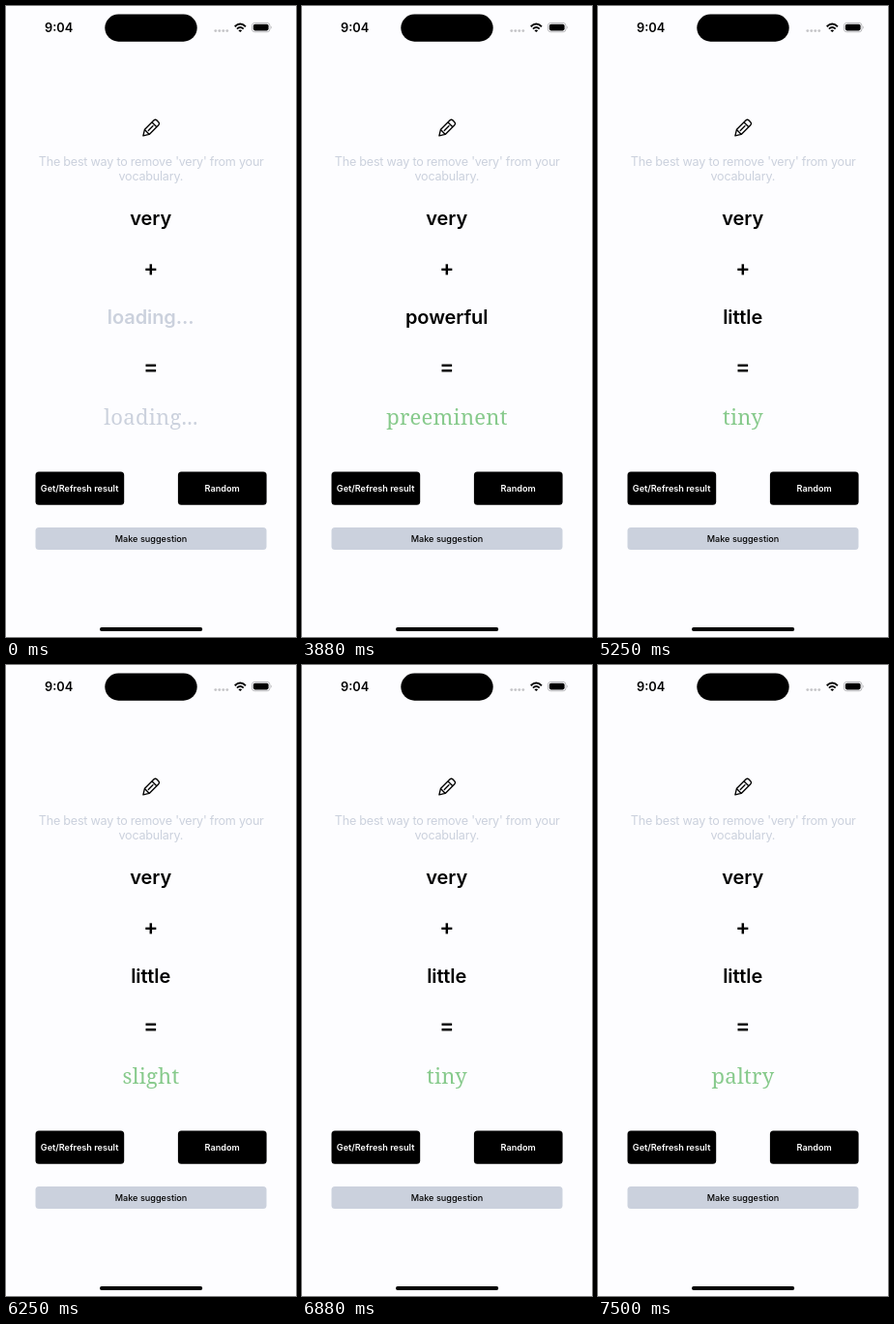
An HTML page that plays this animation: 300x651 px, repeating every 8 s.

```html
<!DOCTYPE html>
<html lang="en">
<head>
<meta charset="utf-8">
<title>Very</title>
<style>
html, body { margin: 0; width: 100%; height: 100%; overflow: hidden; background: #fdfdff; }
svg { display: block; width: 300px; height: 651px; font-family: Inter, Roboto, sans-serif; }
text { text-anchor: middle; }
.intro { font-size: 12.6px; letter-spacing: -.23px; fill: #cbd1dd; }
.big { font-size: 20px; font-weight: 600; letter-spacing: -.1px; }
.sign { font-size: 22.5px; }
.serif { font: 22px "Noto Serif", serif; letter-spacing: .25px; }
.button { font-size: 9.15px; font-weight: 600; }
</style>
</head>
<body>
<svg viewBox="0 0 300 651">
  <!-- status bar -->
  <text x="54.7" y="27" font-size="12.8" font-weight="600">9:04</text>
  <rect x="102.3" y="8.5" width="95.4" height="28.2" rx="14.1"/>
  <g fill="#c4c4c7">
    <circle cx="216.8" cy="25.6" r="1.4"/><circle cx="220.8" cy="25.6" r="1.4"/>
    <circle cx="224.8" cy="25.6" r="1.4"/><circle cx="228.8" cy="25.6" r="1.4"/>
  </g>
  <g fill="none" stroke="#000" stroke-width="1.9">
    <path d="M236.7 21.2Q242.3 16 247.9 21.2M238.9 23.6Q242.3 20.5 245.7 23.6"/>
  </g>
  <path d="M240.4 25.2Q242.3 23.6 244.2 25.2L242.3 27.1Z"/>
  <rect x="254.4" y="17.4" width="18.6" height="9.4" rx="3" fill="none" stroke="#a9a9ac" stroke-width=".8"/>
  <rect x="255.8" y="18.8" width="15.8" height="6.6" rx="1.8"/>
  <path d="M274 20.5Q275.5 22.1 274 23.7Z" fill="#a9a9ac"/>

  <!-- pencil -->
  <path d="M141.9 133.8L143.4 127.6 152.9 118.1Q154.5 116.5 156.1 118.1L157.7 119.7Q159.3 121.3 157.7 122.9L148.2 132.4ZM143.4 127.6L148.2 132.4M151 120L155.8 124.8M147.3 128.5L152 123.8"
    fill="none" stroke="#000" stroke-width="1.35" stroke-linejoin="round" stroke-linecap="round"/>

  <text class="intro" x="150.2" y="164.8">The best way to remove 'very' from your</text>
  <text class="intro" x="149.8" y="180.2">vocabulary.</text>

  <g class="big">
    <text x="149.7" y="226">very</text>
    <text x="149.8" y="278.3" class="sign">+</text>
    <text x="149.7" y="328" id="word"></text>
    <text x="149.8" y="380.3" class="sign">=</text>
  </g>
  <text class="serif" x="150" y="431.5" id="result"></text>

  <g class="button">
    <rect x="30.5" y="480.4" width="91.7" height="34.4" rx="3.5"/>
    <rect x="177.9" y="480.4" width="91.7" height="34.4" rx="3.5"/>
    <rect x="30.5" y="538" width="239" height="22.9" rx="3.5" fill="#cbd1dd"/>
    <text x="76.1" y="500.8" fill="#fff">Get/Refresh result</text>
    <text x="223.7" y="500.8" fill="#fff">Random</text>
    <text x="150" y="552.7" font-weight="500">Make suggestion</text>
  </g>
  <rect x="97" y="641.1" width="106.2" height="3.8" rx="1.9"/>
</svg>
<script>
const LOOP = 8000, GREY = "#cbd1dd", GREEN = "#87ca8c";
// start time, word, result
const steps = [
  [0, "loading...", "loading..."],
  [130, "joyful", "ecstatic"],
  [3880, "powerful", "preeminent"],
  [4880, "little", "tiny"],
  [6250, "little", "slight"],
  [6630, "little", "paltry"],
  [6750, "little", "slight"],
  [6880, "little", "tiny"],
  [7000, "little", "paltry"],
  [7130, "little", "slight"],
  [7250, "little", "tiny"],
  [7500, "little", "paltry"]
];
const word = document.getElementById("word");
const result = document.getElementById("result");
let shown;

function draw() {
  const t = performance.now() % LOOP;
  const step = steps.findLast(s => s[0] <= t);
  if (step !== shown) {
    shown = step;
    const [start, base, better] = step;
    const filled = start >= 3880;
    word.textContent = base;
    result.textContent = better;
    word.setAttribute("fill", filled ? "#000" : GREY);
    result.setAttribute("fill", filled ? GREEN : GREY);
  }
  requestAnimationFrame(draw);
}
draw();
</script>
</body>
</html>
```
